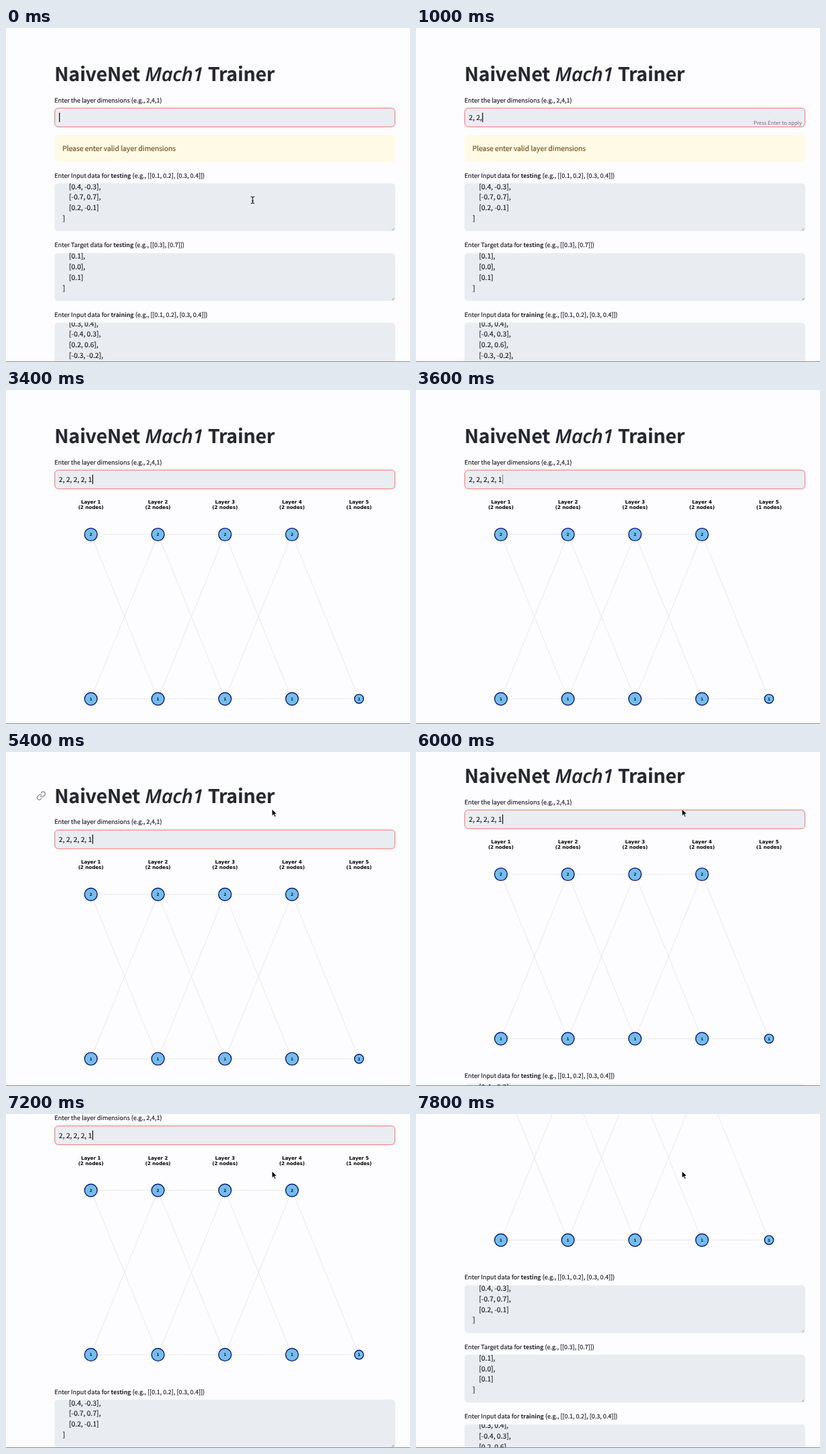
These frames come from a looping animation (600x497 px, 8 s). An HTML page:

```html
<!DOCTYPE html>
<html lang="en">
<head>
<meta charset="utf-8">
<title>NaiveNet Mach1 Trainer</title>
<style>
  html, body { margin: 0; width: 100%; height: 100%; overflow: hidden; background: #fdfcfe; }
  svg { display: block; }
  text {
    font-family: "Noto Sans CJK SC", "Noto Sans CJK JP", "Noto Sans", sans-serif;
    font-size: 10.3px; color: #1d1e26; fill: currentColor; stroke: currentColor; stroke-width: .18px;
    white-space: pre; text-rendering: geometricPrecision;
  }
  .title { font-size: 28.3px; font-weight: 700; letter-spacing: -.005em; color: #262730; }
  .italic { font-family: "Open Sans", "Noto Sans", sans-serif; font-size: 28.7px; font-weight: 600; font-style: italic; }
  .label { font-size: 9px; }
  .hint { font-size: 7.75px; color: #6c6e76; stroke: none; }
  .warn { color: #74501c; }
  .bold { font-size: 8.75px; font-weight: 700; stroke: none; }
  .plot {
    font-family: "DejaVu Sans", sans-serif; font-weight: 700; font-size: 7.1px;
    color: #000; stroke: none; text-anchor: middle;
  }
  .num { font-size: 5.9px; color: #0c1c3c; }
</style>
</head>
<body>
<svg id="stage" width="600" height="497" viewBox="0 0 600 497"></svg>
<script>
const NS = "http://www.w3.org/2000/svg";
const LOOP = 8000, STEP = 200;
const VALUE = "2, 2, 2, 2, 1";
const TEXT_X = 78.5;
const PLOT_SHIFT = 295.4;
const FIELD_FILL = "#e9edf1";
const stage = document.getElementById("stage");

function add(parent, tag, attrs = {}, content) {
  const el = document.createElementNS(NS, tag);
  for (const key in attrs) el.setAttribute(key, attrs[key]);
  if (content !== undefined) el.textContent = content;
  return parent.appendChild(el);
}
const text = (parent, x, y, content, cls = "") => add(parent, "text", { x, y, class: cls }, content);
const show = (el, on) => el.setAttribute("visibility", on ? "visible" : "hidden");
const move = (el, x, y) => el.setAttribute("transform", `translate(${x} ${y})`);

// Page header and input
const page = add(stage, "g");
text(page, 72, 79.3, "NaiveNet", "title");
text(page, 206.5, 79.3, "Mach1", "title italic");
text(page, 299.9, 79.3, "Trainer", "title");
const link = add(page, "g", {
  transform: "translate(45 61) scale(.6)", fill: "none", stroke: "#85868d",
  "stroke-width": 1.9, "stroke-linecap": "round"
});
add(link, "path", { d: "M10 13a5 5 0 0 0 7.54.54l3-3a5 5 0 0 0-7.07-7.07l-1.72 1.71" });
add(link, "path", { d: "M14 11a5 5 0 0 0-7.54-.54l-3 3a5 5 0 0 0 7.07 7.07l1.71-1.71" });

text(page, 72, 110.6, "Enter the layer dimensions (e.g., 2,4,1)", "label");
add(page, "rect", {
  x: 72.4, y: 119.2, width: 505.3, height: 27.9, rx: 5.5,
  fill: FIELD_FILL, stroke: "#f9605f", "stroke-width": .9
});
const value = text(page, TEXT_X, 137, "");
const caret = add(page, "rect", { y: 126, width: 1.3, height: 14, fill: "#1c1d24" });
const hint = text(page, 573, 143.6, "Press Enter to apply", "hint");
hint.setAttribute("text-anchor", "end");

const warning = add(page, "g");
add(warning, "rect", { x: 72, y: 159.3, width: 506, height: 39.7, rx: 5.5, fill: "#fefae6" });
text(warning, 83.7, 183.3, "Please enter valid layer dimensions", "warn");

// Network plot
const plot = add(page, "g");
const TOP = 215, BOTTOM = 459.6;
const layerX = i => 126.1 + i * 99.55;
const layers = [2, 2, 2, 2, 1];
const nodes = layers.map((n, i) =>
  Array.from({ length: n }, (_, k) => ({ x: layerX(i), y: k ? TOP : BOTTOM })));
for (let i = 0; i < 4; i++)
  for (const a of nodes[i])
    for (const b of nodes[i + 1])
      add(plot, "line", { x1: a.x, y1: a.y, x2: b.x, y2: b.y, stroke: "#e4e4e8", "stroke-width": .8 });
layers.forEach((n, i) => {
  text(plot, layerX(i), 169, `Layer ${i + 1}`, "plot");
  text(plot, layerX(i), 177, `(${n} nodes)`, "plot");
  nodes[i].forEach((p, k) => {
    add(plot, "circle", {
      cx: p.x, cy: p.y, r: n > 1 ? 9.4 : 6.7,
      fill: "#74bdeb", stroke: "#0a1a80", "stroke-width": 1.4
    });
    text(plot, p.x, p.y + 2.1, k + 1, "plot num");
  });
});

// Data fields below
const fields = add(page, "g");
function field(y, before, strong, after, firstLine, lines) {
  const label = text(fields, 72, y - 8.3, "", "label");
  add(label, "tspan", {}, before);
  add(label, "tspan", { class: "bold" }, strong);
  add(label, "tspan", {}, after);
  const box = add(fields, "svg", { x: 72, y, width: 506, height: 71.6, overflow: "hidden" });
  add(box, "rect", { width: 506, height: 71.6, rx: 5.5, fill: FIELD_FILL });
  lines.forEach((line, i) => text(box, line === "]" ? 12.2 : 21.6, firstLine + i * 15.75, line));
  add(box, "path", { d: "M501 70.3l3.4-3.4M503 70.3l1.4-1.4", stroke: "#77797f", "stroke-width": .7 });
}
field(231, "Enter Input data for ", "testing", " (e.g., [[0.1, 0.2], [0.3, 0.4]])", 8.7,
  ["[0.4, -0.3],", "[-0.7, 0.7],", "[0.2, -0.1]", "]"]);
field(334.7, "Enter Target data for ", "testing", " (e.g., [[0.3], [0.7]])", 8.7,
  ["[0.1],", "[0.0],", "[0.1]", "]"]);
field(438.3, "Enter Input data for ", "training", " (e.g., [[0.1, 0.2], [0.3, 0.4]])", 5.4,
  ["[0.3, 0.4],", "[-0.4, 0.3],", "[0.2, 0.6],", "[-0.3, -0.2],", "[0.1, 0.5],"]);

add(stage, "rect", { y: 496, width: 600, height: 1, fill: "#8e8e91" });

// Pointers, with the hot spot at the local zero point
const arrow = add(stage, "path", {
  d: "M0 0V10.2L2.4 8L4.1 11.8L5.8 11L4.2 7.3H7.4Z",
  fill: "#000", stroke: "#fff", "stroke-width": .8
});
const beam = add(stage, "path", {
  d: "M-2.8-5Q-.4-5 0-4Q.4-5 2.8-5M0-4V4M-2.8 5Q-.4 5 0 4Q.4 5 2.8 5M-1.4 1.4H1.4",
  fill: "none", stroke: "#17181c", "stroke-width": 1.1
});

const scrollSteps = [
  [5200, 0], [5400, 3.1], [5600, 11], [5800, 23], [6000, 33], [6200, 37], [6400, 38],
  [6600, 38], [6800, 47], [7000, 69], [7200, 101.4], [7400, 154], [7600, 216], [7800, 272]
];
const pointerSteps = [[4200, 366, 256], [4400, 374, 196], [4600, 386, 128], [4800, 395, 85]];
const lastStep = (steps, t) => steps.filter(s => s[0] <= t).pop();

function caretOpacity(t) {
  if (t > 0 && t < 3000) return 1;
  const phase = t % 1000;
  return phase < 600 ? 1 : phase < 800 ? .45 : 0;
}

function render(t) {
  const scroll = (lastStep(scrollSteps, t) || [0, 0])[1];
  const trained = t >= 3200;
  move(page, 0, -scroll);
  move(fields, 0, trained ? PLOT_SHIFT : 0);
  show(plot, trained);
  show(warning, !trained);
  show(hint, t >= 200 && t < 3000);
  show(link, t >= 4800 && t < 5600);

  value.textContent = VALUE.slice(0, Math.floor(t / STEP));
  caret.setAttribute("x", TEXT_X + value.getComputedTextLength() + .3);
  caret.setAttribute("opacity", caretOpacity(t));

  const pointer = t < 200 ? [0, 366, 256] : lastStep(pointerSteps, t);
  const y = pointer ? pointer[2] : 0;
  const overInput = y + scroll > 119 && y + scroll < 147;
  const asBeam = t < 200 || overInput;
  show(beam, pointer && asBeam);
  show(arrow, pointer && !asBeam);
  if (pointer) {
    move(beam, pointer[1] + .3, y);
    move(arrow, pointer[1], y);
  }
}

const start = performance.now();
let shown = -1;
function tick() {
  const elapsed = Math.max(0, performance.now() - start) % LOOP;
  const t = Math.floor(elapsed / STEP) * STEP;
  if (t !== shown) render(shown = t);
  requestAnimationFrame(tick);
}
tick();
</script>
</body>
</html>
```
